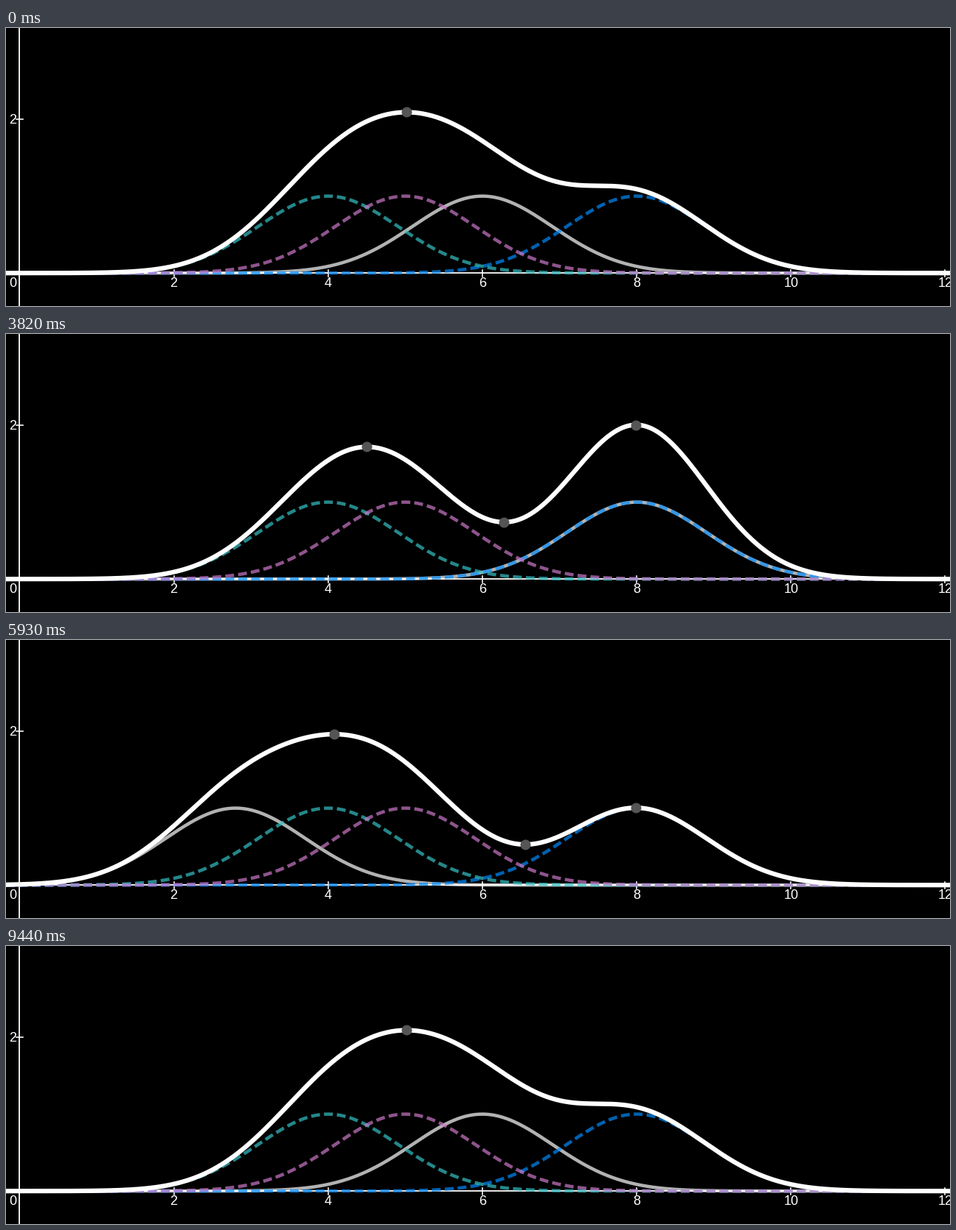
Write a matplotlib script that moves like this. It is 1280 by 378 pixels and loops after 9480 ms.

```python
import numpy as np
import matplotlib.pyplot as plt
from matplotlib.animation import FuncAnimation

W, H, DPI = 1280, 378, 100
STEP, LOOP = 30, 9480            # ms
X0, Y0, UNIT = 18.3, 333.2, 104.6
K = 0.61                         # bell sharpness
FIXED = (8, 4, 5)
COLORS = ("#008bfb", "#36c2c6", "#cb78c8")
START, LEAD, SPEED = 1490, 1415, 2.5
ALPHA = 0.7


def pt(px):
    return px * 72 / DPI


def sx(x):
    return X0 + UNIT * np.asarray(x)


def sy(y):
    return Y0 - UNIT * np.asarray(y)


def bell(x, c):
    return np.exp(-K * (x - c) ** 2)


def total(x, centers):
    return sum(bell(x, c) for c in centers)


def slope(x, centers):
    return sum((c - x) * bell(x, c) for c in centers)


def center_at(t):
    """Slider value: rests at 6, then bounces between 0 and 10."""
    if t < START:
        return 6.0
    elapsed = min(t - LEAD, 8000) / 1000
    p = (6 + SPEED * elapsed) % 20
    return round(10 - abs(p - 10), 1)


def extrema(centers):
    d = slope(xs, centers)
    i = np.flatnonzero(d[:-1] * d[1:] < 0)
    x = xs[i] + (xs[i + 1] - xs[i]) * d[i] / (d[i] - d[i + 1])
    return x, total(x, centers)


fig = plt.figure(figsize=(W / DPI, H / DPI), dpi=DPI, facecolor="black")
ax = fig.add_axes([0, 0, 1, 1])
ax.set_xlim(0, W)
ax.set_ylim(H, 0)
ax.axis("off")

xs = (np.arange(0, W + 12, 2) - X0) / UNIT


def stroke(x, y, width, color="white", z=1, **kw):
    return ax.plot(x, y, color=color, lw=pt(width), zorder=z, **kw)[0]


def label(x, y, text):
    ax.text(x, y, text, color="white", fontsize=pt(18), ha="center",
            va="baseline", family="Liberation Sans", zorder=1.5, clip_on=True)


# axes, ticks and labels
stroke([X0, X0], [0, H], 1.8)
stroke([0, W], [Y0, Y0], 1.8)
for n in range(2, 13, 2):
    stroke([sx(n)] * 2, [Y0 - 4.5, Y0 + 4.5], 1.6)
    label(float(sx(n)), 352, str(n))
stroke([X0 - 4.5, X0 + 4.5], [sy(2)] * 2, 1.6)
label(9, 352, "0")
label(9, 130, "2")

mover = stroke([], [], 4.5, z=2, alpha=ALPHA)
for z, (c, color) in enumerate(zip(FIXED, COLORS), 3):
    stroke(sx(xs), sy(bell(xs, c)), 4.5, color, z, alpha=ALPHA,
           dashes=(12 / 4.5, 5.5 / 4.5), dash_capstyle="butt")
whole = stroke([], [], 6.2, z=7)
dots, = ax.plot([], [], "o", color="#555555", ms=pt(14), mew=0, zorder=8)


def update(i):
    m = center_at(i * STEP)
    centers = FIXED + (m,)
    mover.set_data(sx(xs), sy(bell(xs, m)))
    whole.set_data(sx(xs), sy(total(xs, centers)))
    x, y = extrema(centers)
    dots.set_data(sx(x), sy(y))
    return mover, whole, dots


anim = FuncAnimation(fig, update, frames=LOOP // STEP, interval=STEP,
                     repeat=True, repeat_delay=0, blit=False)
plt.show()
```
